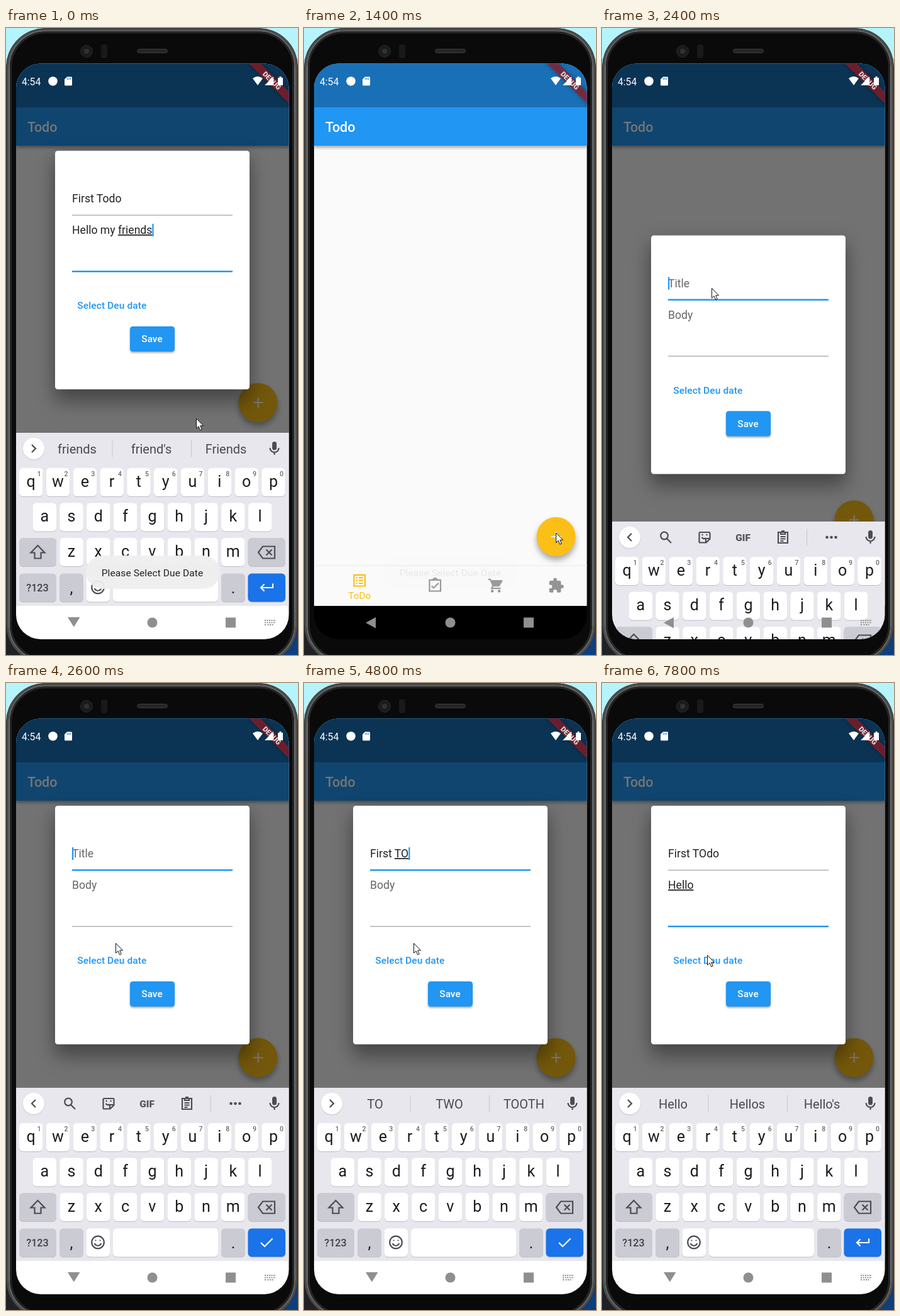
An HTML page for the animation above (8 s loop, 464x996 px).

```html
<!DOCTYPE html>
<html lang="en">
<head>
<meta charset="utf-8">
<title>Todo</title>
<style>
html, body { margin: 0; width: 100%; height: 100%; overflow: hidden; background: #0a0a0a; }
svg { display: block; font-family: Roboto, "Noto Sans", sans-serif; }
text { white-space: pre; }
.mid { text-anchor: middle; }
.bold { font-weight: 500; }
.line { fill: none; stroke: #4c4d53; stroke-width: 2.2; }
.field { font-size: 17.6px; fill: #222; }
.hint { font-size: 17.6px; fill: #666; }
.composing { text-decoration: underline; }
.key { font-size: 25px; fill: #1c1c1f; text-anchor: middle; }
.digit { font-size: 10.5px; fill: #66676c; text-anchor: middle; font-weight: 500; }
.word { font-size: 20px; fill: #48494e; text-anchor: middle; }
#dialog > .card { filter: drop-shadow(0 20px 14px #0004) drop-shadow(0 6px 14px #0003); }
.raised { filter: drop-shadow(0 2px 1.5px #0005); }
.bar { filter: drop-shadow(0 3px 2.5px #0005); }
#fab circle { filter: drop-shadow(0 6px 5px #0005); }
</style>
</head>
<body>
<svg width="464" height="996" viewBox="0 0 464 996">
  <defs>
    <clipPath id="screen"><rect x="16" y="56.500" width="433.500" height="914.500" rx="39"/></clipPath>
    <clipPath id="app"><rect x="16" y="56" width="434" height="862"/></clipPath>
  </defs>

  <!-- desktop and phone body -->
  <path fill="#b5f4fc" d="M0 0h464v500H0z"/>
  <path fill="#202124" d="M0 500h232v496H0z"/>
  <path fill="#0b3f80" d="M232 500h232v496H232z"/>
  <g fill="none">
    <rect x=".5" y=".5" width="463" height="1009" rx="62" fill="#0a0a0a" stroke="#2a2b2c"/>
    <rect x="2.500" y="2" width="459" height="1006" rx="60" stroke="#4a4b4c" stroke-width="3"/>
    <rect x="5" y="4.500" width="454" height="1001" rx="57.500" stroke="#6c6d6e" stroke-width="2"/>
    <rect x="7.500" y="7" width="449" height="996" rx="55" stroke="#262627" stroke-width="3"/>
  </g>
  <circle cx="128" cy="37" r="9.5" fill="#1b1b1c" stroke="#272728"/>
  <circle cx="128" cy="37" r="4" fill="#303134"/>
  <rect x="151" y="26" width="10" height="22" rx="4" fill="#191919"/>
  <rect x="208.500" y="33.500" width="48" height="6" rx="3" fill="#252526" stroke="#3b3b3c"/>

  <g clip-path="url(#screen)">
    <g clip-path="url(#app)">
      <path fill="#fafafa" d="M16 56h434v862H16z"/>
      <path class="bar" fill="#2196f3" d="M16 56h434v131H16z"/>
      <path fill="#1970b6" d="M16 56h434v70H16z"/>
      <text class="bold" x="34" y="165" font-size="21.500" fill="#fff">Todo</text>
      <path fill="#eee" d="M16 853.500h434v1.500H16z"/>
      <g transform="translate(75 864.500) scale(1.1)" fill="none" stroke="#fbbf17" stroke-width="2">
        <path d="M4 4h16v16H4zM11 8h6M11 12h6M11 16h6M7 8h2M7 12h2M7 16h2"/>
      </g>
      <text class="mid" x="88.300" y="906.500" font-size="15.300" fill="#fbbf17">ToDo</text>
      <g fill="none" stroke="#949494" stroke-width="2">
        <path transform="translate(195 872.500) scale(1.1)" d="M4 4h16v16H4zM9 4a3 2.500 0 0 1 6 0M7 12.500l3 3 7-7"/>
        <path transform="translate(291.500 872.500) scale(1.1)" d="M1 3h3l4 9-2 4h13M8 12.500h9"/>
      </g>
      <g transform="translate(291.500 872.500) scale(1.1)" fill="#949494">
        <path d="M5 4h16q1 0 .8 1.500l-4.300 7.500H8z"/>
        <circle cx="7" cy="20" r="2"/><circle cx="17" cy="20" r="2"/>
      </g>
      <path transform="translate(387.500 872.500) scale(1.1)" fill="#949494"
        d="M4 5h4V3.500a2.500 2.500 0 0 1 5 0V5h4q2 0 2 2v4h1.500a2.500 2.500 0 0 1 0 5H19v4q0 2-2 2h-3.800v-1.500a2.700 2.700 0 0 0-5.400 0V22H4q-2 0-2-2v-3.800h1.500a2.700 2.700 0 0 0 0-5.400H2V7q0-2 2-2z"/>
      <g id="fab">
        <circle cx="400.500" r="31" fill="#fbbf17"/>
        <path d="M393 0h15.400M400.700-7.700V7.700" stroke="#fff" stroke-width="2.200"/>
      </g>
    </g>
    <path d="M16 918h434v53H16z"/>
    <path id="scrim" d="M16 56h434v862H16z"/>

    <g id="dialog">
      <rect class="card" x="78" width="309" height="379" rx="4.400" fill="#fff"/>
      <text class="hint" id="titleHint" x="105" y="82">Title</text>
      <text class="hint" id="bodyHint" x="105" y="132">Body</text>
      <text class="field" id="title" x="105" y="82"><tspan></tspan><tspan></tspan></text>
      <text class="field" id="body" x="105" y="132"><tspan></tspan><tspan></tspan></text>
      <path id="titleLine" d="M105 102.300h255"/>
      <path id="bodyLine" d="M105 191.700h255"/>
      <rect id="caret" width="2.200" height="20" fill="#2196f3"/>
      <text class="bold" x="113.300" y="251" font-size="15.500" letter-spacing=".1" fill="#2196f3">Select Deu date</text>
      <rect class="raised" x="197" y="279" width="71" height="40" rx="4.400" fill="#2196f3"/>
      <text class="mid bold" x="232" y="304" font-size="15.400" fill="#fff">Save</text>
    </g>

    <g transform="translate(449 57) rotate(45)">
      <path fill="#a01a25" fill-opacity=".66" d="M-62 30.900H62v13.200H-62z" style="filter:drop-shadow(0 0 3px #0008)"/>
      <text class="mid" y="41.500" font-size="11.200" font-weight="900" fill="#ddd">DEBUG</text>
    </g>

    <g id="keyboard">
      <path fill="#e8e7ee" d="M16 643h434v275H16z"/>
      <path fill="#fff" d="M16 918h434v53H16z"/>
      <circle cx="44" cy="668" r="17" fill="#fff" style="filter:drop-shadow(0 1px 1px #0002)"/>
      <path class="line" id="chevron"/>
      <g id="words">
        <text class="word" x="113" y="675.500"></text>
        <text class="word" x="231" y="675.500"></text>
        <text class="word" x="349.500" y="675.500"></text>
        <path stroke="#c6c6cc" d="M169 654.500v27M294.500 654.500v27"/>
      </g>
      <g id="tools" class="line">
        <circle cx="99" cy="665.500" r="5.800"/><path d="M103 670l7 7"/>
        <path d="M156 660h14q1.500 0 1.500 1.500v9l-6 6h-9.500q-1.500 0-1.500-1.500v-13.500q0-1.500 1.500-1.500zM165 676v-6h6M158.500 668q3 4 6 1"/>
        <path d="M158.500 664h2M165.500 664h2" stroke-width="2.500"/>
        <text class="mid" x="224" y="673.500" font-size="15.500" font-weight="900" fill="#55565c" stroke="none">GIF</text>
        <path d="M280 660h15v17h-15zM284 660v3h7v-3M283.500 667h8M283.500 670.500h8M283.500 674h5"/>
        <path d="M285 658.500h5" stroke-width="3"/>
        <path stroke="#c6c6cc" stroke-width="1" d="M325.500 654.500v27"/>
        <path d="M357.500 668h.01M364.500 668h.01M371.500 668h.01" stroke-width="4.600" stroke-linecap="round"/>
      </g>
      <rect x="423" y="657" width="7" height="13.500" rx="3.500" fill="#4c4d53"/>
      <path class="line" d="M419.500 667a7 7 0 0 0 14 0M426.500 674v4"/>
      <g id="keys"></g>
      <path class="line" d="M50.500 822l-11 11.500h6v9h10v-9h6z"/>
      <path class="line" d="M401 833l7-9.500h19v19h-19zM413.500 828.500l9 9M422.500 828.500l-9 9"/>
      <circle class="line" cx="146" cy="888.500" r="9.800"/>
      <path class="line" d="M141 891q5 6 10 0M142.500 885.500h.01M149.500 885.500h.01" stroke-linecap="round"/>
      <path id="enter" fill="none" stroke="#fff" stroke-width="2.200"/>
    </g>

    <g id="toast">
      <rect x="127" y="838" width="213" height="53" rx="26.500" fill="#efeff0" opacity=".94"/>
      <text class="mid" x="232.500" y="871" font-size="15.500" letter-spacing=".1" fill="#222">Please Select Due Date</text>
    </g>

    <g fill="#8f8f8f">
      <path id="back"/>
      <circle cx="232.500" cy="944.500" r="8"/>
      <path d="M349 936.500h16v16h-16z"/>
      <path id="switcher" fill="none" stroke="#8f8f8f" stroke-width="2" stroke-dasharray="2 1.500" d="M411 941h18M411 944.500h18M411 948h3M415.500 948h9"/>
    </g>

    <g fill="#fff">
      <text x="25" y="90.500" font-size="15.700">4:54</text>
      <circle cx="74.500" cy="84.500" r="7.300"/>
      <path d="M97 77.500h6.500q1.500 0 1.500 1.500v11q0 1.500-1.500 1.500h-9q-1.500 0-1.500-1.500V81.500z"/>
      <path d="M392 80q8-6 16 0l-8 11zM425 77v14h-14zM432 79h2.500v-2h3v2h2.500v12h-8z"/>
      <path stroke="#1970b6" stroke-width="1.200" d="M97.500 79.500v2.500M100 79.500v2.500M102.500 79.500v2.500"/>
    </g>
  </g>
  <path id="cursor" fill="#fff" stroke="#111" d="M.5.5v15.500l3.600-3.300 2.500 6 2.600-1.100-2.500-5.800h4.800z"/>
</svg>

<script>
const el = id => document.getElementById(id);
const set = (id, attrs) => {
  for (const name in attrs) el(id).setAttribute(name, attrs[name]);
};
const show = (id, on) => set(id, { visibility: on ? 'visible' : 'hidden' });

function key(x, y, w, fill = '#fff') {
  const rect = (dy, color) =>
    `<rect x="${x}" y="${y + dy}" width="${w}" height="45" rx="6" fill="${color}"/>`;
  return rect(1, '#bdbdc5') + rect(0, fill);
}
const label = (cls, x, y, s) => `<text class="${cls}" x="${x}" y="${y}">${s}</text>`;

function buildKeys() {
  const grey = '#cbcbd3';
  let out = '';
  [['qwertyuiop', 39.7, 699], ['asdfghjkl', 61.2, 754.5], ['zxcvbnm', 104, 810]].forEach(([row, x0, y], r) =>
    [...row].forEach((c, i) => {
      const x = x0 + i * 42.8;
      out += key(x - 18.7, y, 37.5) + label('key', x, y + 29.5, c);
      if (!r) out += label('digit', x + 13, y + 12.5, (i + 1) % 10);
    }));
  out += key(21, 810, 59, grey) + key(384.5, 810, 59.5, grey);
  [[21, 59, grey], [85, 38, grey], [127.5, 37.5], [170, 167], [342, 38, grey], [384.5, 59.5, '#1a73e8']]
    .forEach(([x, w, fill]) => { out += key(x, 866.5, w, fill); });
  out += '<text class="mid bold" x="50" y="895" font-size="16.2" fill="#3f4045">?123</text>';
  out += label('key', 104, 898, ',') + label('key', 361, 898, '.');
  el('keys').innerHTML = out;
}

// Discrete changes: each entry overrides what came before it.
const steps = [
  [0, { title: 'First Todo', body: 'Hello my friends', focus: 'body', words: "friends friend's Friends" }],
  [1600, { title: '', body: '', focus: '', words: '' }],
  [2400, { focus: 'title' }],
  [3000, { title: 'F' }],
  [3200, { title: 'Fi' }],
  [3400, { title: 'Fir', words: 'Fir First Fire' }],
  [3600, { title: 'Firs', words: 'Firs First Fire' }],
  [3800, { title: 'First', words: "First Firsts First's" }],
  [4000, { title: 'First ', words: 'of time and' }],
  [4400, { title: 'First T', words: 'T To The' }],
  [4600, { title: 'First TO' }],
  [4800, { words: 'TO TWO TOOTH' }],
  [5000, { title: 'First TOd', words: 'TOd Today TODAY' }],
  [5200, { title: 'First TOdo', words: 'TOdo Todo TODO' }],
  [5600, { focus: 'body', words: '' }],
  [6400, { body: 'H' }],
  [6600, { body: 'He', words: "He He's Her" }],
  [6800, { body: 'Hel', words: 'Hel Hello Help' }],
  [7000, { body: 'Hell', words: "Hell Hello Hell's" }],
  [7200, { body: 'Hello', words: "Hello Hellos Hello's" }],
];

// Continuous motion: [time, value] points joined linearly.
const HIDDEN = 328;
const tracks = {
  keyboard: [[0, 0], [200, 60], [400, HIDDEN], [2200, HIDDEN], [2400, 141], [2600, 0]],
  dialogY: [[0, 195], [200, 215], [400, 332.5], [2200, 332.5], [2400, 329.5], [2600, 195]],
  fabY: [[0, 595], [200, 640], [400, 808], [2200, 808], [2400, 781.5], [2600, 595]],
  dialog: [[0, 1], [200, .5], [400, 0], [1600, 0], [1800, 1]],
  toast: [[0, 1], [1000, 1], [1200, .6], [1400, .08], [1600, 0]],
  cursorX: [[0, 302], [400, 302], [1200, 400], [1600, 400], [2000, 174], [7400, 174], [7800, 167]],
  cursorY: [[0, 620], [400, 620], [1200, 801.5], [1600, 801.5], [2000, 413], [7400, 413], [7800, 432]],
};

function at(points, t) {
  const i = points.findIndex(p => p[0] > t);
  if (i < 0) return points[points.length - 1][1];
  const [t0, a] = points[i - 1], [t1, b] = points[i];
  return a + (b - a) * (t - t0) / (t1 - t0);
}

function drawField(id, s) {
  const text = s[id], active = s.focus === id;
  const cut = active && s.words ? text.lastIndexOf(' ') + 1 : text.length;
  const [head, tail] = el(id).children;
  head.textContent = text.slice(0, cut);
  tail.textContent = text.slice(cut);
  tail.setAttribute('class', 'composing');
  set(id + 'Hint', { opacity: [1, .35][text.length] || 0 });
  set(id + 'Line', { stroke: active ? '#2196f3' : '#8c8c8c', 'stroke-width': active ? 2.6 : 1.1 });
  if (active) {
    const width = text ? el(id).getComputedTextLength() : 0;
    set('caret', { x: 105 + width, y: id === 'title' ? 66 : 116 });
  }
}

function render(t) {
  const s = Object.assign({}, ...steps.filter(e => e[0] <= t).map(e => e[1]));
  const v = {};
  for (const name in tracks) v[name] = at(tracks[name], t);

  set('fab', { transform: `translate(0 ${v.fabY})` });
  set('scrim', { opacity: v.dialog * .54 });
  set('dialog', { transform: `translate(0 ${v.dialogY})`, opacity: v.dialog });
  drawField('title', s);
  drawField('body', s);
  show('caret', s.focus && t < 7700);

  const typing = v.keyboard < HIDDEN;
  show('keyboard', typing);
  show('switcher', typing);
  set('keyboard', { transform: `translate(0 ${v.keyboard})` });
  set('back', { d: v.keyboard ? 'M114 936v17.500l-16-8.700z' : 'M98 936h19.500l-9.700 15.500z' });
  set('words', { display: s.words ? 'inline' : 'none' });
  set('tools', { display: s.words ? 'none' : 'inline' });
  s.words.split(' ').forEach((w, i) => { el('words').children[i].textContent = w; });
  set('chevron', { d: s.words ? 'M41 662l6 6-6 6' : 'M47 662l-6 6 6 6' });
  set('enter', { d: s.focus === 'body' ? 'M424 882.500v6.500h-19M410.500 883.500l-5.500 5.500 5.500 5.500' : 'M405 889l6 6 12.500-12.500' });

  set('toast', { opacity: v.toast });
  set('cursor', { transform: `translate(${v.cursorX} ${v.cursorY})` });
}

// The screen updates five times per second.
const LOOP = 8000, TICK = 200;
const start = performance.now();
function frame() {
  const t = (performance.now() - start) % LOOP;
  render(Math.floor(t / TICK) * TICK);
  requestAnimationFrame(frame);
}
buildKeys();
frame();
</script>
</body>
</html>
```
